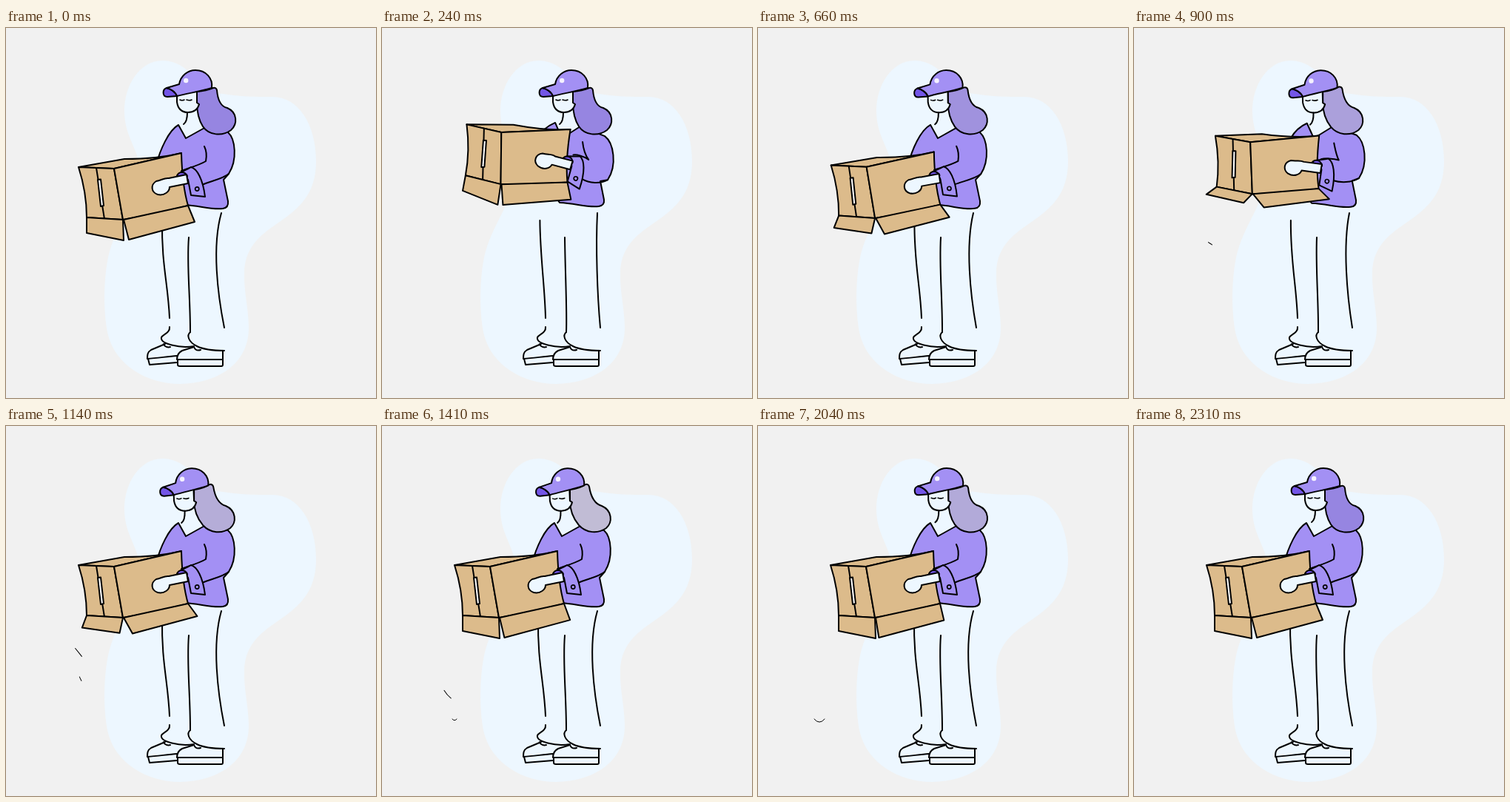
Recreate the animation shown at these times as an HTML page with a canvas. Size 500 px wide and 500 px high, loop 2340 ms.

```html
<!DOCTYPE html>
<html lang="en">
<head>
<meta charset="utf-8">
<title>Courier with a box</title>
<style>
html, body { margin: 0; width: 100%; height: 100%; overflow: hidden; background: #f1f1f1; }
canvas { display: block; width: 100%; height: 100%; }
</style>
</head>
<body>
<canvas id="stage" width="500" height="500"></canvas>
<script>
const ctx = document.getElementById('stage').getContext('2d');
const LOOP = 2340;
const INK = '#000', PALE = '#edf7ff', PURPLE = '#a390f4', VIOLET = '#7355e6', TAN = '#dcbb8b';

const lerp = (a, b, u) => a + (b - a) * u;
const ramp = (t, from, to) => Math.min(1, Math.max(0, (t - from) / (to - from)));
const ease = p => (1 - Math.cos(Math.PI * p)) / 2;
const hump = (t, from, to) => Math.sin(Math.PI * ramp(t, from, to)) ** 2;

// Motion rules, all depending on time alone.
const liftAt = t => 1.35 * hump(t, 60, 600) + 1.2 * hump(t, 638, 1008);
const swayAt = t => ease(ramp(t, 300, 1250)) - ease(ramp(t, 1400, 2300));
const flapAt = t => hump(t, 420, 1380);
const greyAt = t => ramp(t, 420, 1770) - ramp(t, 1770, 2300);

// Blends two path strings that share the same commands.
function morph(a, b, u) {
  const number = /-?\d+(\.\d+)?/g, ends = b.match(number);
  let i = 0;
  return a.replace(number, v => lerp(+v, +ends[i++], u).toFixed(3));
}

function draw(d, fill, width = 2) {
  const path = new Path2D(d);
  if (fill) { ctx.fillStyle = fill; ctx.fill(path); }
  if (width) { ctx.strokeStyle = INK; ctx.lineWidth = width; ctx.stroke(path); }
}

// Draws a rigid group moved by (dx, dy) and turned around (x, y).
function rigid(x, y, dx, dy, angle, paint) {
  ctx.save();
  ctx.translate(x + dx, y + dy);
  ctx.rotate(angle);
  ctx.translate(-x, -y);
  paint();
  ctx.restore();
}

const BLOB = 'M212 44C180 44 160 78 160 112C160 150 182 165 180 195C178 235 148 265 138 310' +
  'C131 345 132 390 138 415C148 455 190 481 235 481C285 480 328 455 328 405C328 380 321 355 322 330' +
  'C325 255 419 270 419 180C419 130 395 93 360 93C320 93 315 92 285 88C258 82 250 45 212 44Z';

function drawLegs(u) {
  draw(morph('M211 260C210 320 219 345 221 392', 'M213 260C213 310 220 350 221 392', u));
  draw(morph('M247 283C244 320 249 360 249 411', 'M247 283C247 330 250 380 249 411', u));
  draw(morph('M291 250C278 295 286 360 295 405', 'M291 250C287 295 290 360 295 405', u));
  draw('M221 404C222 412 212 414 210 418C208 427 235 433 254 430');
  draw('M215 427L196 435C191 438 191 442 191 447C205 446 218 444 231 443');
  draw('M192 447L194 455L231 452M213 427C214 431 219 432 222 431');
  draw('M249 411C244 415 246 424 258 430C270 436 285 436 295 436');
  draw('M254 431L238 436C232 439 231 444 231 448H293V436M254 431C256 436 260 436 263 435');
  draw('M232 448V455Q232 457 235 457H291Q293 457 293 455V448');
}

function drawTorso(u) {
  draw(morph(
    'M233 131L243 149L270 134L300 141C310 150 313 178 301 197L294 205L300 234Q301 243 293 244C277 246 262 240 240 239L203 185C208 165 220 138 233 131Z',
    'M234 128L243 149L268 133L301 146C313 155 318 185 305 205L295 207L300 232Q301 240 293 241C277 243 262 237 240 236L203 185C203 160 208 139 234 128Z',
    u), PURPLE);
}

function drawHead(sway, grey) {
  const hair = [150, 133, 225].map(c => Math.round(lerp(c, 208, grey)));
  draw(morph(
    'M258 86C268 85 275 83 280 81Q284 80 285 84C286 96 289 106 299 108C313 114 313 130 304 138C292 147 274 145 266 133C259 122 258 108 258 101Z',
    'M254 86C264 85 271 82 275 79Q279 78 280 82C282 94 286 105 297 108C311 114 312 130 303 138C292 146 276 145 266 134C256 122 254 108 254 101Z',
    sway), `rgb(${hair})`);
  rigid(250, 115, -3.5 * sway, .5 * sway, -.04 * sway, () => {
    draw('M231 88V100Q233 114 246 114Q258 114 261 103L258 101V87', PALE);
    draw('M245 114C245 122 243 128 240 130');
    draw('M235 97Q238 98.5 241 97M244 97Q248 98.5 251 97', null, 1.6);
    draw('M217 81C211 83 211 93 218 93L231 92C229 86 222 82 217 81Z', VIOLET);
    draw('M217 81L234 76C236 64 246 57 256 57C270 57 280 68 278 81C262 86 246 88 231 92C229 86 222 82 217 81Z', PURPLE);
    draw('M240 71a3.2 3.2 0 1 0 6.4 0a3.2 3.2 0 1 0 -6.4 0Z', '#f4f1ff', 0);
  });
}

function drawBox(u, open, swing) {
  rigid(146, 190, 15 * u, -48 * u, .18 * u, () => {
    draw('M98 188L160 177Q205 177 237 169L146 190Z', TAN);
    draw('M98 188L146 190L158 259L109 256Q109 222 98 188Z', TAN);
    draw('M146 190L237 169Q238 212 246 240Q202 252 158 259Z', TAN);
    draw('M122 189L133 258');
    draw('M124 205L128 204.5L132 240L128 241Z', '#fff');
    draw(morph('M109 256L158 259L159 287L109 277Z', 'M109 256L158 259L148 272.5L96.5 268Z', open), TAN);
    const front = morph('M159 259L246 240L255 262L166 286Z', 'M159 259L246 240L262 252L176 275Z', open);
    draw(morph(front, 'M159 259L246 240L248 263L161 286Z', swing), TAN);
  });
}

function drawArm(u) {
  draw(morph('M268 160C272 168 271 175 270 180C262 185 245 190 237 193',
    'M271 154C272 163 274 171 279 178C272 173 262 171 258 172', u));
  draw(morph('M301 197C293 204 276 207 265 212', 'M305 205C295 211 280 210 270 204', u));
  rigid(258, 218, 3.3 * u, -14 * u, .45 * u, () => {
    draw('M231 200C233 194 243 193 250 188C258 190 266 204 269 228L250 226L246 205C243 199 238 197 231 200Z', PURPLE);
    draw('M231 200C233 194 241 193 245 200L243 204Z', VIOLET);
    draw('M244 198L220 203C214 202 210 206 203 207C195 212 196 222 205 225C214 227 221 221 221 215L246 210Z', PALE);
    draw('M255.6 217.5a2.6 2.6 0 1 0 5.2 0a2.6 2.6 0 1 0 -5.2 0Z', null, 1.7);
  });
}

// A thin strand drops out of the box, turns, settles and curls.
function drawStrand(age, life, drift, length) {
  if (age < 0 || age > life) return;
  const p = ramp(age, 0, 600);
  const half = length / 2, sag = .6 * length * p ** 6;
  rigid(0, 0, 104 + drift * p, 270 + 126 * p, 1.15 * Math.sin(Math.PI * p), () =>
    draw(`M${-half} 0Q0 ${sag} ${half} 0`, null, 1));
}

function render(t) {
  const u = liftAt(t);
  ctx.fillStyle = '#f1f1f1';
  ctx.fillRect(0, 0, 500, 500);
  draw(BLOB, PALE, 0);
  drawLegs(liftAt(t + 30));
  drawTorso(u);
  drawHead(swayAt(t), greyAt(t));
  drawBox(u, flapAt(t), hump(t, 1300, 2300));
  drawArm(u);
  drawStrand(t - 800, 700, -6, 6);
  drawStrand(t - 970, 1130, -21, 14);
}

ctx.lineJoin = ctx.lineCap = 'round';
const start = performance.now();
function tick() {
  render((performance.now() - start) % LOOP);
  requestAnimationFrame(tick);
}
tick();
</script>
</body>
</html>
```
